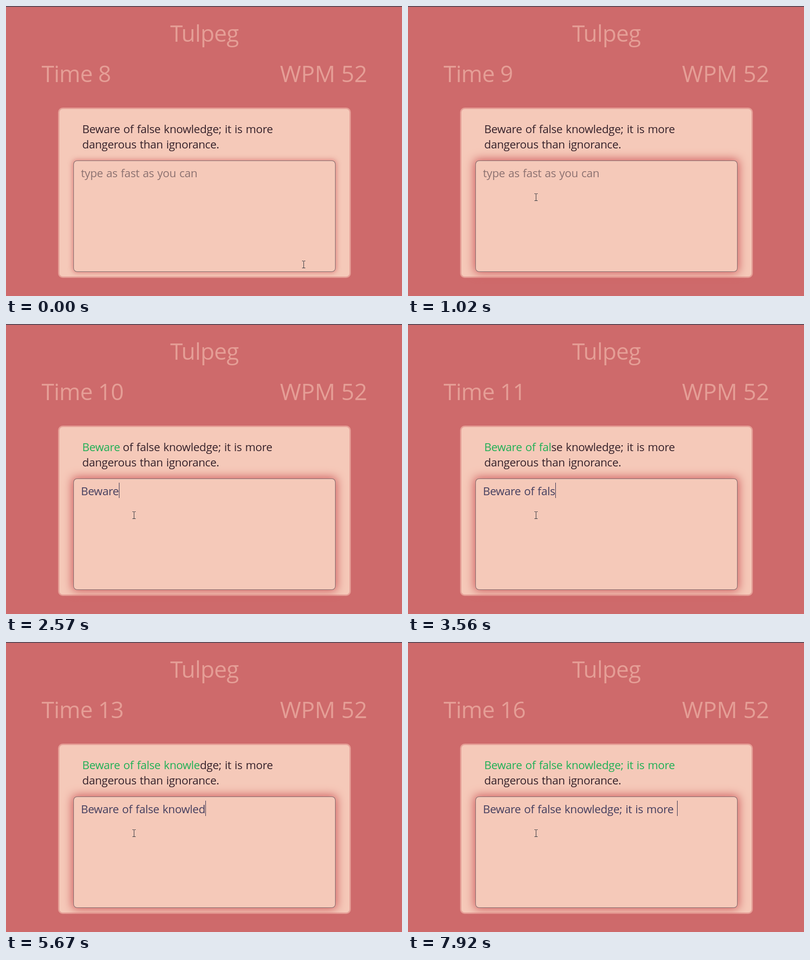
Write an HTML page with a canvas that moves like this. It is 852 px wide and 625 px high and loops after 8000 ms.

```html
<!DOCTYPE html>
<html lang="en">
<head>
<meta charset="utf-8">
<title>Typing test</title>
<style>
  html, body { margin: 0; width: 100%; height: 100%; overflow: hidden; background: #ce6a6b; }
  canvas { display: block; }
</style>
</head>
<body>
<canvas id="stage" width="852" height="625"></canvas>
<script>
const ctx = document.getElementById('stage').getContext('2d');
const LOOP = 8000;
const FAMILY = '"Open Sans", "Noto Sans", sans-serif';
const LINES = ['Beware of false knowledge; it is more', 'dangerous than ignorance.'];

const RED = '#ce6a6b', PEACH = '#f5c9b9', ROSE = '#e59e96';
const INK = '#35212a', GREEN = '#1fb055', NAVY = '#443e5f', HINT = '#8c7170';

// Typing bursts: text, time of the first key, time between keys
const BURSTS = [
  ['Beware ', 1480, 182], ['of ', 2800, 75], ['false ', 3180, 126],
  ['kn', 4280, 150], ['owledge', 4980, 167], ['; ', 6360, 170],
  ['it ', 6680, 150], ['is ', 7230, 75], ['more ', 7610, 77]
];
const LAG = 60; // the highlight trails the key press
const FOCUS = 490, BLINK = 530;

const clamp = v => Math.max(0, Math.min(1, v));
const mix = (a, b, k) => a + (b - a) * k;
const smooth = (t, from, to) => {
  const k = clamp((t - from) / (to - from));
  return k * k * (3 - 2 * k);
};

function typedAt(t) {
  let text = '', last = FOCUS;
  for (const [word, begin, step] of BURSTS) {
    if (t < begin) break;
    const n = Math.min(word.length, Math.floor((t - begin) / step) + 1);
    text += word.slice(0, n);
    last = begin + (n - 1) * step;
  }
  return { text, last };
}

function box(x, y, w, h, r, color) {
  ctx.beginPath();
  ctx.roundRect(x, y, w, h, r);
  ctx.fillStyle = color;
  ctx.fill();
}

function setFont(size, letter, word) {
  ctx.font = `${size}px ${FAMILY}`;
  ctx.letterSpacing = letter + 'px';
  ctx.wordSpacing = word + 'px';
}

function write(str, x, y, color) {
  ctx.fillStyle = color;
  ctx.fillText(str, x, y);
}

function glowLevel(t) {
  return t < FOCUS ? 0.55 * clamp(1 - t / 160) : clamp((t - FOCUS + 20) / 320);
}

function drawGlow(level) {
  if (!level) return;
  const away = 2000, spread = 2.5 * level;
  ctx.save();
  ctx.shadowColor = `rgba(206, 92, 94, ${Math.min(1, 0.35 + level * 0.65)})`;
  ctx.shadowBlur = 20 * level;
  ctx.shadowOffsetX = away;
  box(145 - spread - away, 333 - spread, 564 + 2 * spread, 240 + 2 * spread, 8, '#000');
  ctx.restore();
}

// The pointer glides to the field, clicks, then moves out of the way
function drawPointer(t) {
  const go = smooth(t, 300, FOCUS), leave = smooth(t, 570, 800);
  const x = Math.round(mix(640, 266, go) + 9 * leave);
  const y = Math.round(mix(557, 360, go) + 52 * leave);
  ctx.fillStyle = '#2a3038';
  ctx.fillRect(x, y - 7, 1, 15);
  for (const dy of [-8, 7]) {
    ctx.fillRect(x - 3, y + dy, 3, 1);
    ctx.fillRect(x + 1, y + dy, 3, 1);
  }
}

function drawHeader(t) {
  ctx.fillStyle = RED;
  ctx.fillRect(0, 0, 852, 625);
  ctx.fillStyle = '#3d4252';
  ctx.fillRect(0, 0, 852, 1);
  ctx.fillStyle = '#76505c';
  ctx.fillRect(0, 1, 852, 1);

  setFont(49, -0.7, 0);
  ctx.textAlign = 'center';
  write('Tulpeg', 427, 77, ROSE);
  ctx.textAlign = 'left';
  const seconds = 8 + Math.floor((t + 200) / 1000);
  write('Time ' + seconds, 76.5, 164, ROSE);
  setFont(49, 0, 0);
  write('WPM 52', 589.5, 164, ROSE);
}

function drawCard(t) {
  box(112, 219, 630, 367, 10, ROSE);
  box(115, 222, 624, 361, 7, PEACH);
  drawGlow(glowLevel(t));
  box(145, 333, 564, 240, 8, '#79676a');
  box(146, 334, 562, 238, 7, PEACH);

  setFont(24, -0.32, 1.2);
  const good = typedAt(t - LAG).text;
  write(good, 164, 274, GREEN);
  write(LINES[0].slice(good.length), 164 + ctx.measureText(good).width, 274, INK);
  write(LINES[1], 164, 307, INK);

  const { text, last } = typedAt(t);
  if (text) write(text, 161.2, 369, NAVY);
  else write('type as fast as you can', 161.2, 369, HINT);

  const since = t - last;
  if (since >= 0 && Math.floor(since / BLINK) % 2 === 0) {
    ctx.fillStyle = '#29294a';
    ctx.fillRect(Math.round(161.5 + ctx.measureText(text).width), 342, 1, 33);
  }
}

const start = performance.now();
function frame() {
  const t = (performance.now() - start) % LOOP;
  drawHeader(t);
  drawCard(t);
  drawPointer(t);
  requestAnimationFrame(frame);
}
frame();
</script>
</body>
</html>
```
